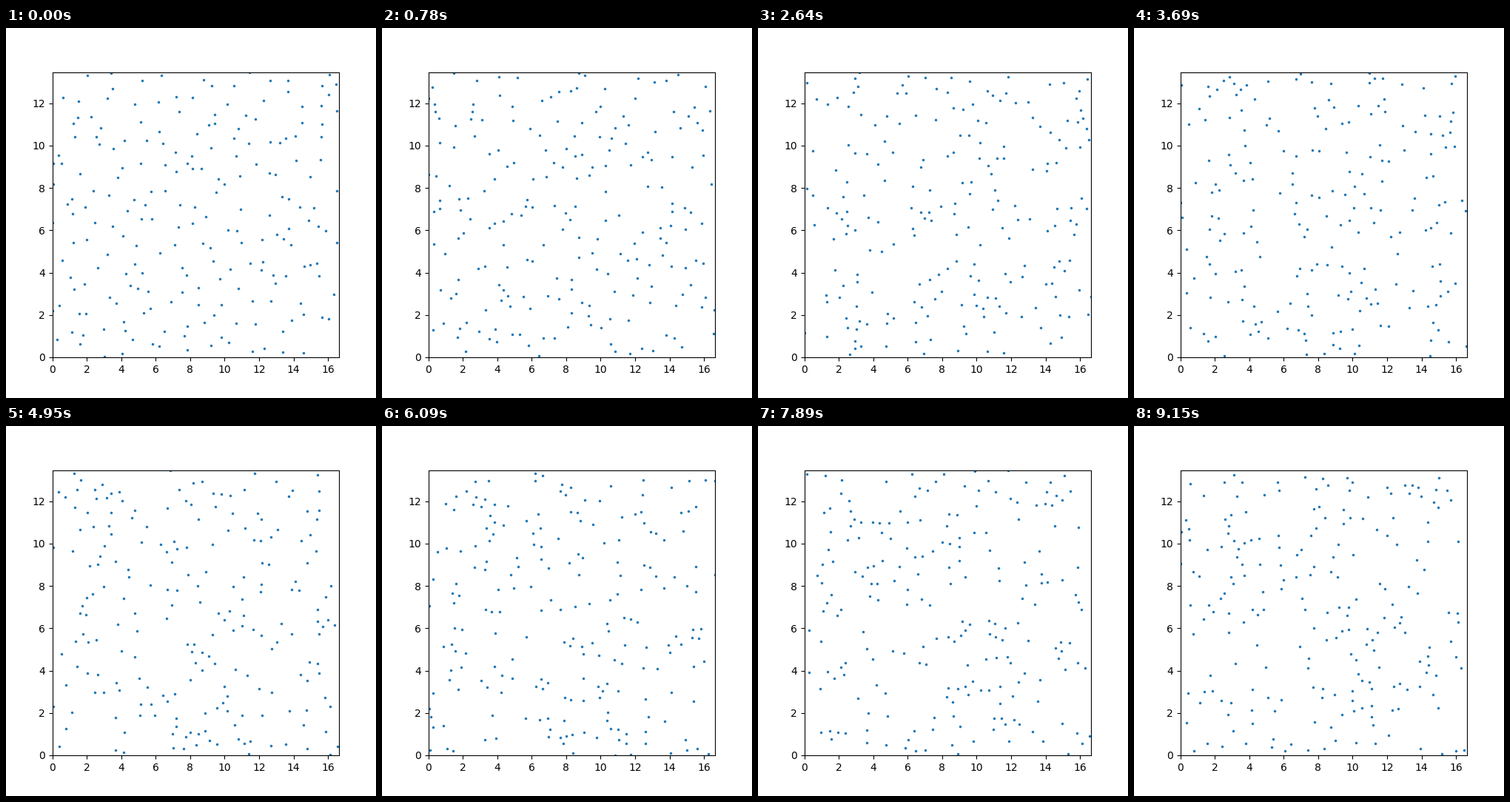
Write a matplotlib script that moves like this. It is 500x500 px and loops after 9.18 s.

```python
import numpy as np
import matplotlib.pyplot as plt
from matplotlib.animation import FuncAnimation

# Two-dimensional Lennard-Jones gas (argon-like, lengths in nm),
# released from a triangular lattice
COLS, ROWS = 15, 14
N = COLS * ROWS
BOX = np.array([16.64, 13.46])
SIGMA = 0.34
CUTOFF = 2.5 * SIGMA
TEMP = 0.8
DT = 0.009
SUBSTEPS = 6
WARMUP = 22
FRAMES = 306
INTERVAL = 30

rng = np.random.default_rng(12)
PAIRS = np.triu_indices(N, 1)


def nearest(d):
    return d - BOX * np.round(d / BOX)


def lattice():
    row, col = np.divmod(np.arange(N), COLS)
    x = (col + 0.25 + 0.5 * (row % 2)) / COLS
    y = (row + 0.5) / ROWS
    return np.column_stack([x, y]) * BOX


def neighbours(pos):
    i, j = PAIRS
    d = nearest(pos[i] - pos[j])
    close = (d ** 2).sum(axis=1) < (CUTOFF + 0.2) ** 2
    return i[close], j[close]


def forces(pos, i, j):
    d = nearest(pos[i] - pos[j]) / SIGMA
    r2 = (d ** 2).sum(axis=1)
    s6 = r2 ** -3
    f = d * (24 * s6 * (2 * s6 - 1) / r2 * (r2 < 6.25))[:, None]
    total = np.zeros_like(pos)
    np.add.at(total, i, f)
    np.add.at(total, j, -f)
    return total


def advance(pos, vel):
    """Velocity Verlet over one frame."""
    i, j = neighbours(pos)
    acc = forces(pos, i, j)
    for _ in range(SUBSTEPS):
        vel = vel + acc * DT / 2
        pos = (pos + SIGMA * vel * DT) % BOX
        acc = forces(pos, i, j)
        vel = vel + acc * DT / 2
    return pos, vel


def simulate():
    pos = lattice()
    vel = rng.normal(0, np.sqrt(TEMP), (N, 2))
    vel -= vel.mean(axis=0)
    for _ in range(WARMUP):
        pos, vel = advance(pos, vel)
    path = np.empty((FRAMES, N, 2))
    for n in range(FRAMES):
        path[n] = pos
        pos, vel = advance(pos, vel)
    return path


path = simulate()

fig, ax = plt.subplots(figsize=(5, 5), dpi=100)
ax.set_xlim(0, BOX[0])
ax.set_ylim(0, BOX[1])
dots, = ax.plot([], [], ".", markersize=3)


def update(n):
    dots.set_data(path[n, :, 0], path[n, :, 1])
    return dots,


anim = FuncAnimation(fig, update, frames=FRAMES, interval=INTERVAL,
                     repeat=True, repeat_delay=0)
plt.show()
```
